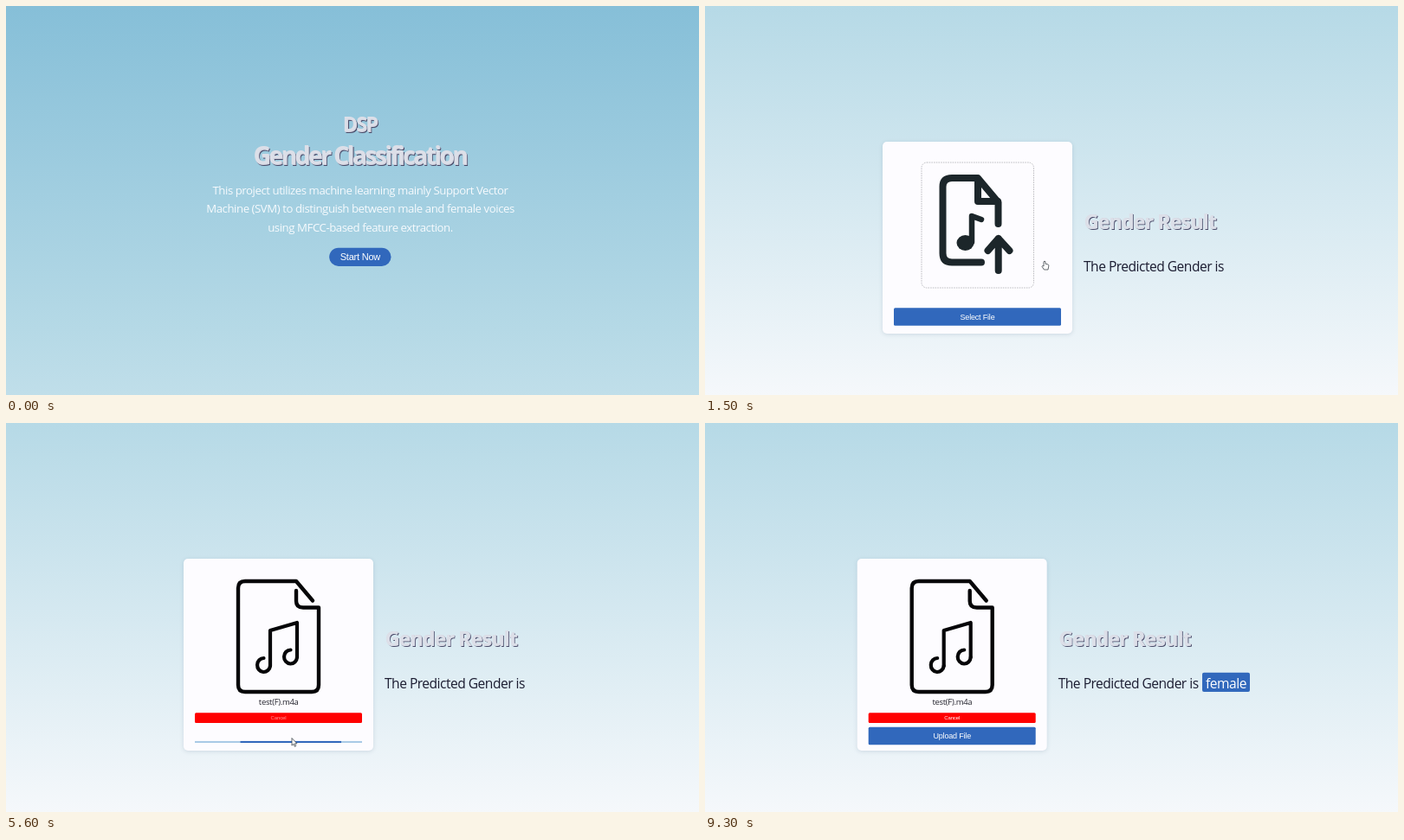
Write an HTML page with a canvas that moves like this. It is 800x450 px and loops after 10000 ms.

```html
<!DOCTYPE html>
<html lang="en">
<head>
<meta charset="utf-8">
<title>Gender Classification</title>
<style>
  html, body { margin: 0; width: 100%; height: 100%; overflow: hidden; }
  canvas { display: block; width: 800px; height: 450px; }
</style>
</head>
<body>
<canvas id="stage" width="800" height="450"></canvas>
<script>
const ctx = document.getElementById('stage').getContext('2d');
const LOOP = 10000, STEP = 100;
const PAGE_HEIGHT = 830, SCROLL_END = 380;
const BLUE = '#3168bc', CARD = '#fdfcff', INK = '#1b1c31';
const SANS = '"Open Sans", "Noto Sans", sans-serif';
const ARIAL = '"Liberation Sans", Arial, sans-serif';
const TRACKING = -0.033;

const clamp = x => Math.min(1, Math.max(0, x));
const mix = (a, b, p) => a + (b - a) * p;
const smooth = x => x * x * (3 - 2 * x);

function bezier(x1, y1, x2, y2) {
  const at = (a, b, s) => 3 * (1 - s) ** 2 * s * a + 3 * (1 - s) * s * s * b + s ** 3;
  return x => {
    let lo = 0, hi = 1;
    for (let i = 0; i < 24; i++) {
      const mid = (lo + hi) / 2;
      if (at(x1, x2, mid) < x) lo = mid; else hi = mid;
    }
    return at(y1, y2, lo);
  };
}
const longEase = bezier(0.65, 0.815, 0.735, 0.395);
const shortEase = bezier(0.165, 0.84, 0.44, 1);

// Tracking is in em.
function text(str, x, y, size, color, { family = SANS, weight = 400, align = 'left', tracking = TRACKING } = {}) {
  ctx.font = `${weight} ${size}px ${family}`;
  ctx.textAlign = align;
  ctx.letterSpacing = tracking * size + 'px';
  ctx.fillStyle = color;
  ctx.fillText(str, x, y);
}

function box(x, y, w, h, r, fill) {
  ctx.beginPath();
  ctx.roundRect(x, y, w, h, r);
  ctx.fillStyle = fill;
  ctx.fill();
}

function stroke(d, width, color) {
  ctx.lineWidth = width;
  ctx.strokeStyle = color;
  ctx.lineCap = ctx.lineJoin = 'round';
  ctx.stroke(new Path2D(d));
}

function button(label, x, y, w, h, r, fill, size, color, baseline) {
  box(x, y, w, h, r, fill);
  text(label, x + w / 2, baseline, size, color, { family: ARIAL, align: 'center', tracking: -0.02 });
}

// Light letters with a light body and a thin dark edge at the lower right.
function raisedText(str, x, y, size, depth, tracking) {
  const style = { weight: 700, tracking };
  text(str, x + depth, y + depth, size, '#484a68', style);
  text(str, x + depth / 2, y + depth / 2, size, '#cfd0dd', style);
  text(str, x, y, size, '#dcdfe8', style);
}

function background(scroll) {
  const g = ctx.createLinearGradient(0, -scroll, 0, PAGE_HEIGHT - scroll);
  g.addColorStop(0, '#86bfd8');
  g.addColorStop(0.45, '#b5d9e6');
  g.addColorStop(1, '#f5f8fb');
  ctx.fillStyle = g;
  ctx.fillRect(0, 0, 800, 450);
}

function hero(hovered) {
  raisedText('DSP', 388.8, 145, 23, 1.6, -0.07);
  raisedText('Gender Classification', 285.5, 183, 28, 1.6, -0.086);
  [
    'This project utilizes machine learning mainly Support Vector',
    'Machine (SVM) to distinguish between male and female voices',
    'using MFCC-based feature extraction.'
  ].forEach((line, i) => text(line, 409, 218.2 + 21.2 * i, 13.2, '#f6fafd', { align: 'center' }));
  button('Start Now', 373.2, 279.7, 71.3, 21.2, 10.6, hovered ? '#4f78be' : BLUE, 11, '#fff', 294.2);
}

function uploadIcon() {
  const c = '#1c262a';
  stroke('M338.5 252V227L315 199H285Q274.5 199 274.5 209V286Q274.5 296.5 285 296.5H319', 8, c);
  stroke('M315 201V226H338', 8, c);
  stroke('M308 273V243L319 247', 6.5, c);
  stroke('M338.7 306V269M326.5 283L338.7 269L351.5 283', 8, c);
  ctx.beginPath();
  ctx.ellipse(300.5, 274, 10, 9, 0, 0, Math.PI * 2);
  ctx.fillStyle = c;
  ctx.fill();
}

function musicFileIcon() {
  stroke('M354 205.5L335 183H276Q268 183 268 191V303Q268 311 276 311H353Q361 311 361 303V213.5H343Q335 213.5 335 206V194', 4.4, '#060608');
  stroke('M305 281V240L336 231V271', 4.2, '#060608');
  stroke('M305 281A7.5 8 0 1 1 297.5 272M336 271A7.5 8 0 1 1 328.5 262.5', 4.2, '#060608');
}

function dropZone(hovered) {
  box(250, 181, 129.5, 145, 6, hovered ? '#eceaed' : CARD);
  ctx.setLineDash([1.5, 1.2]);
  ctx.lineWidth = 0.9;
  ctx.strokeStyle = '#b4b4b8';
  ctx.stroke();
  ctx.setLineDash([]);
  uploadIcon();
}

// Indeterminate bar: one long and one short runner per cycle.
function progress(elapsed) {
  const x = 218, w = 193, y = 367.8, h = 2.2, cycle = 2100;
  ctx.save();
  ctx.beginPath();
  ctx.rect(x, y, w, h);
  ctx.clip();
  box(x, y, w, h, 0, '#a9cae6');
  const runner = (time, ease, left, right) => {
    if (time < 0) return;
    const p = ease(clamp(time % cycle / (cycle * 0.6)));
    const a = mix(left[0], left[1], p), b = 1 - mix(right[0], right[1], p);
    box(x + a * w, y, Math.max(0, b - a) * w, h, 0, BLUE);
  };
  runner(elapsed, longEase, [-0.35, 1], [1, -0.9]);
  runner(elapsed - 1150, shortEase, [-2, 1.07], [1, -0.08]);
  ctx.restore();
}

function card(t) {
  ctx.save();
  ctx.shadowColor = 'rgba(60,90,120,0.18)';
  ctx.shadowBlur = 5;
  ctx.shadowOffsetY = 1;
  box(205, 157, 219, 222, 5, CARD);
  ctx.restore();

  if (t < 4200) {
    dropZone(t >= 1900);
    button('Select File', 218, 349.3, 193, 20.5, 1.5, BLUE, 9, t < 1900 ? '#fff' : '#7f9fd6', 362.8);
    return;
  }
  const loading = t >= 5000 && t < 7500;
  musicFileIcon();
  text('test(F).m4a', 314.7, 325.6, 9.5, '#25252f', { align: 'center' });
  button('Cancel', 218, 335.2, 193, 11.8, 1.5, '#ff0000', 6, loading ? '#ff9a9a' : '#fff', 343.2);
  if (loading) progress(t - 5030);
  else button('Upload File', 218, 351.8, 193, 20.4, 1.5, BLUE, 9, '#fff', 365);
}

function result(done) {
  raisedText('Gender Result', 437.5, 257.5, 23, 1.4, TRACKING);
  text('The Predicted Gender is', 437, 306.8, 15.6, INK);
  if (!done) return;
  box(603.3, 288.8, 55, 22.2, 2, BLUE);
  text('female', 630.8, 306.8, 15.6, '#fff', { align: 'center' });
}

function pointer(d, x, y) {
  ctx.save();
  ctx.translate(x, y);
  const path = new Path2D(d);
  ctx.fillStyle = '#fff';
  ctx.fill(path);
  ctx.lineWidth = 0.8;
  ctx.lineJoin = 'round';
  ctx.strokeStyle = '#3a4248';
  ctx.stroke(path);
  ctx.restore();
}
const ARROW = 'M0 0V8.6L2 6.8L3.3 9.8L4.7 9.2L3.4 6.3H6Z';
const HAND = 'M-1 5V.8Q0-.6 1 .8V3.2L4 4Q5 4.3 4.8 5.6L4 10H-.6L-3 6.3Q-2.6 4.8-1 6Z';

function cursor(t) {
  const glide = (shape, from, to, start, end) => {
    const p = smooth(clamp((t - start) / (end - start)));
    pointer(shape, mix(from[0], to[0], p), mix(from[1], to[1], p));
  };
  if (t >= 100 && t < 900) glide(ARROW, [455, 108], [392, 295], 100, 900);
  else if (t >= 900 && t < 2200) glide(HAND, [392, 295], [362, 285], 1600, 2000);
  else if (t >= 4200 && t < 9100) glide(ARROW, [490, 285], [330, 364.5], 4200, 4900);
  else if (t >= 9100 && t < 9300) glide(ARROW, [330, 364.5], [276, 425], 9000, 9200);
}

function draw(t) {
  const scroll = t < 1200 ? 0 : Math.round(SCROLL_END * smooth(clamp((t - 1064) / 390)));
  const done = t >= 7500;
  background(scroll);
  ctx.save();
  ctx.translate(0, -scroll);
  hero(t >= 900);
  ctx.translate(done ? -29.3 : 0, SCROLL_END);
  card(t);
  result(done);
  ctx.restore();
  cursor(t);
}

const begin = performance.now();
function tick() {
  const t = (performance.now() - begin) % LOOP;
  draw(Math.floor(t / STEP) * STEP);
  requestAnimationFrame(tick);
}
tick();
</script>
</body>
</html>
```
